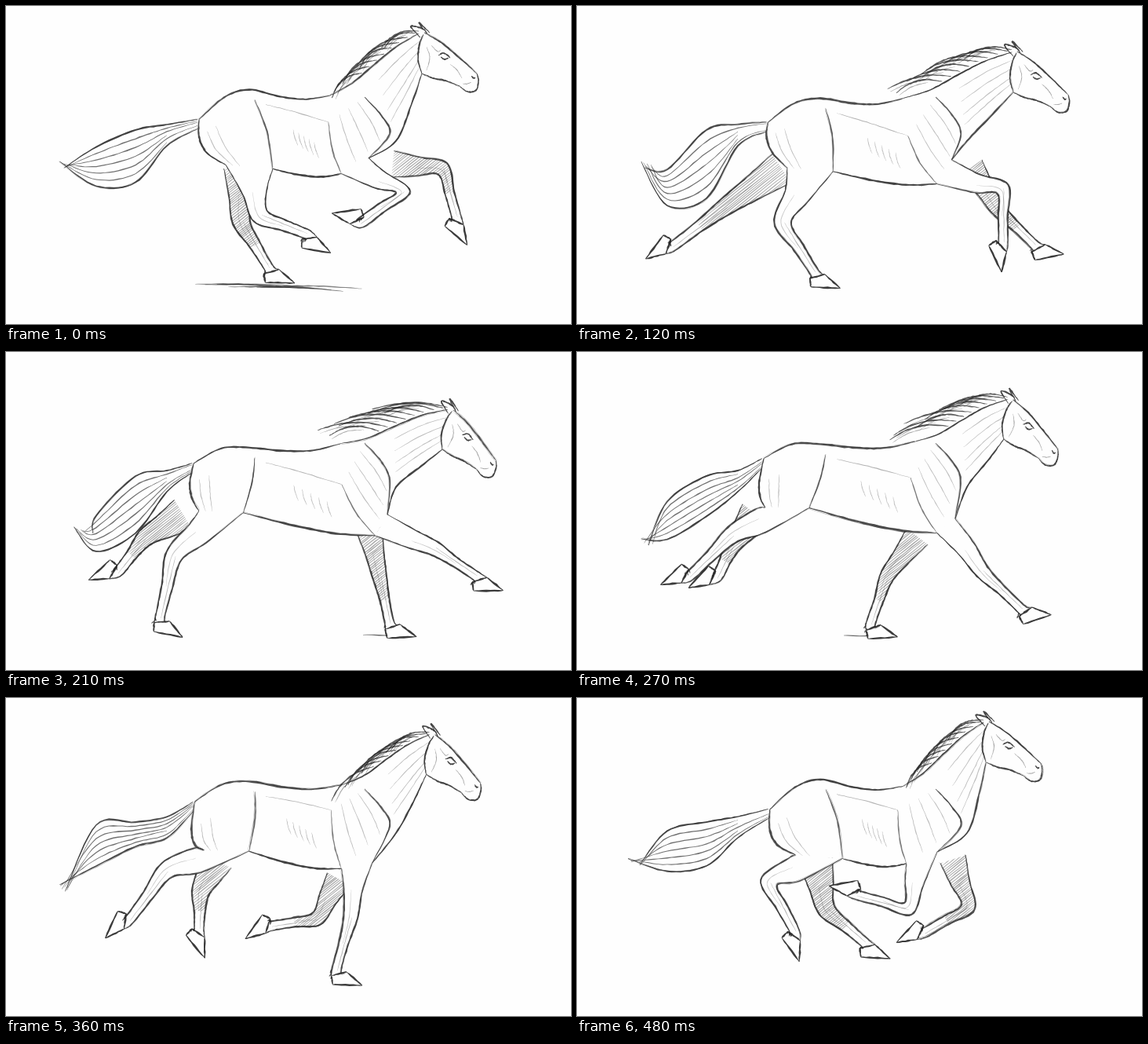
An HTML page with a canvas that plays this animation: 720x405 px, repeating every 510 ms.

```html
<!DOCTYPE html>
<html lang="en">
<head>
<meta charset="utf-8">
<title>Galloping horse</title>
<style>
html, body { margin: 0; width: 100%; height: 100%; overflow: hidden; background: #fefefe; }
canvas { display: block; }
</style>
</head>
<body>
<canvas id="stage" width="720" height="405"></canvas>
<script>
const ctx = document.getElementById('stage').getContext('2d');
const PAPER = '#fefefe', TAU = Math.PI * 2;

// A stride has 16 drawings; key poses fall on these.
const KEYS = [0, 1, 3, 6, 8, 11, 15], CYCLE = 16;

// Each key pose: fetlock x, y, bend of the joint above it, hoof angle.
const GAIT = {
  nearHind: [[384, 291, 30, 38], [397, 312, 17, 35], [303, 340, 38, 31], [196, 339, 24, 40],
    [143, 286, 12, 164], [157, 283, 24, 143], [278, 298, 51, 82]],
  farHind: [[335, 334, 18, 30], [276, 337, 29, 39], [122, 306, 2, 155], [142, 281, 10, 166],
    [178, 288, 5, 161], [246, 294, 9, 79], [367, 312, 20, 32]],
  nearFront: [[451, 277, -58, 200], [478, 288, -48, 171], [543, 301, -42, 93], [600, 286, -6, 28],
    [567, 328, 7, 10], [421, 347, -6, 30], [357, 251, -48, 198]],
  farFront: [[574, 269, -36, 69], [594, 279, -23, 42], [584, 305, 7, 17], [489, 346, 0, 26],
    [374, 347, 10, 25], [339, 290, -25, 154], [443, 299, -40, 161]],
};
// Poll x, y and tilt of the head.
const NOD = [[530, 38, 0], [536, 40, 0], [558, 62, 2.5], [566, 77, 12], [552, 64, 10], [543, 50, 9], [522, 34, 1]];

const HIND_RADII = [22, 16, 11, 7, 6], FRONT_RADII = [17, 12, 9, 6, 6];
const HOOF = [[12, -5], [38, 0], [5, 18], [-2, 9]];

let step = 0, seed = 1;
const rnd = () => { const v = Math.sin(seed++ * 12.9898) * 43758.5453; return v - Math.floor(v); };
const wave = (mean, amp, peak) => mean + amp * Math.cos((step - peak) / CYCLE * TAU);
const lerp = (a, b, t) => a + (b - a) * t;
const mix = (p, q, t) => p.map((v, i) => lerp(v, q[i], t));
const add = ([x, y], dx, dy) => [x + dx, y + dy];
const between = (a, b, t) => a.map((p, i) => mix(p, b[i], t));
const rotate = ([x, y], a) => [x * Math.cos(a) - y * Math.sin(a), x * Math.sin(a) + y * Math.cos(a)];
const place = (p, origin, degrees) => add(rotate(p, degrees * TAU / 360), ...origin);

// Monotone cubic through the cyclic key poses.
function tween(rows) {
  const n = KEYS.length;
  const at = k => rows[(k + n) % n];
  const gap = k => (KEYS[(k + 1) % n] - KEYS[k % n] + CYCLE) % CYCLE;
  const k = KEYS.findLastIndex(s => s <= step), h = gap(k), u = (step - KEYS[k]) / h;
  return at(k).map((v, i) => {
    const slope = j => (at(j + 1)[i] - at(j)[i]) / gap((j + n) % n);
    const tangent = j => {
      const a = slope(j - 1), b = slope(j);
      return a * b <= 0 ? 0 : 2 * a * b / (a + b);
    };
    return lerp(v, at(k + 1)[i], u * u * (3 - 2 * u)) +
      h * u * (1 - u) * (tangent(k) * (1 - u) - tangent(k + 1) * u);
  });
}

// Catmull-Rom curve.
function smooth(pts, n = 9) {
  const out = [];
  for (let i = 0; i < pts.length - 1; i++) {
    const a = pts[i - 1] || pts[i], b = pts[i], c = pts[i + 1], d = pts[i + 2] || c;
    for (let s = 0; s < n; s++) {
      const t = s / n;
      out.push([0, 1].map(j => b[j] + t * ((c[j] - a[j]) / 2 +
        t * (a[j] - 2.5 * b[j] + 2 * c[j] - d[j] / 2 + t * (1.5 * (b[j] - c[j]) + (d[j] - a[j]) / 2)))));
    }
  }
  return [...out, pts[pts.length - 1]];
}

function trace(pts) {
  ctx.beginPath();
  pts.forEach(p => ctx.lineTo(...p));
  ctx.closePath();
}
function fill(pts, style = PAPER) {
  trace(pts);
  ctx.fillStyle = style;
  ctx.fill();
}
function normals(line) {
  const last = line.length - 1;
  return line.map((_, i) => {
    const p = line[Math.max(0, i - 1)], q = line[Math.min(last, i + 1)];
    const dx = q[0] - p[0], dy = q[1] - p[1], len = Math.hypot(dx, dy) || 1;
    return [-dy / len, dx / len];
  });
}

// Tapered stroke with uneven edges.
function pencil(pts, width = 1.7, alpha = .8) {
  const line = smooth(pts), left = [], right = [];
  normals(line).forEach(([nx, ny], i) => {
    const taper = .35 + .65 * Math.sin(Math.PI * i / (line.length - 1));
    const w = width * taper * (.7 + .6 * rnd()) / 2, shift = (rnd() - .5) * .5;
    left.push(add(line[i], nx * (shift + w), ny * (shift + w)));
    right.unshift(add(line[i], nx * (shift - w), ny * (shift - w)));
  });
  fill([...left, ...right], `rgba(38,38,38,${alpha})`);
}
// A firm line with loose lines searching around it.
function sketch(pts, width = 2.1, alpha = .8) {
  pencil(pts, width, alpha);
  for (let i = 0; i < 2; i++) {
    const dx = rnd() * 2.6 - 1.3, dy = rnd() * 2.6 - 1.3;
    pencil(pts.map(p => add(p, dx, dy)), 1, .33);
  }
}

function limb(keys, root, radii, frontTop, rearTop) {
  const [x, y, bend, angle] = tween(keys), foot = [x, y];
  const [nx, ny] = normals([root, foot])[0];
  const knee = add(mix(root, foot, .5), nx * bend, ny * bend);
  const axis = [root, mix(root, knee, .5), knee, mix(knee, foot, .5), foot];
  const normal = normals(axis);
  const edge = sign => axis.map((p, i) => add(p, ...normal[i].map(v => v * sign * radii[i])));
  const front = edge(-1), rear = edge(1);
  if (frontTop) [front[0], rear[0]] = [frontTop, rearTop];
  const hoof = HOOF.map(p => place(p, foot, angle));
  return { front, rear, hoof, foot, shape: [...smooth(front), ...hoof, ...smooth(rear).reverse()] };
}

function drawLimb({ front, rear, hoof }) {
  const [top, toe, heel, back] = hoof;
  sketch([...front, top]);
  sketch([...rear, back]);
  [[top, toe], [toe, heel], [heel, back], [top, back]].forEach(line => pencil(line, 2.3, .9));
  for (let i = 0; i < 4; i++) {
    const root = mix(rear[4], back, i / 3);
    pencil([root, add(root, rnd() * 6 - 4, 2 + rnd() * 3)], 1.4, .75);
  }
  pencil(between(front, rear, .4).slice(2), .9, .35);
  pencil(between(front, rear, .6).slice(1, 4), .9, .25);
}

function hatch({ front, rear }) {
  const area = [...smooth(front.slice(0, 4)), ...smooth(rear.slice(0, 4)).reverse()];
  const xs = area.map(p => p[0]), ys = area.map(p => p[1]);
  const left = Math.min(...xs), width = Math.max(...xs) - left;
  ctx.save();
  trace(area);
  ctx.clip();
  for (let y = Math.min(...ys); y < Math.max(...ys) + width; y += 2.5 + rnd() * 1.5)
    pencil([[left, y], [left + width, y - width * .8]], 1.2, .4);
  ctx.restore();
}

function drawTail(base) {
  const tip = [wave(75, 12, 5.5), wave(222, 24, 9.5)];
  const strands = 7;
  for (let i = 0; i < strands; i++) {
    const k = i / (strands - 1), outer = i === 0 || i === strands - 1;
    const line = [
      add(base, -2, k * 12),
      [205, 151 + k * 27],
      [165, lerp(158, wave(217, 28, 3.3), k)],
      [115, lerp(wave(185, 28, 4.5), wave(234, 24, 4.5), k)],
      add(tip, (1 - k) * 26 * rnd(), (1 - k) * 8 - 4),
    ];
    const from = outer ? 0 : Math.floor(rnd() * 2);
    if (outer) sketch(line, 2);
    else pencil(line.slice(from), 1.3, .65);
  }
}

function drawMane(crest) {
  const curve = smooth(crest), count = 9;
  const droop = wave(18, 18, 13.5), length = wave(68, -16, 14);
  for (let i = 0; i < count; i++) {
    const k = i / count;
    const root = add(curve[Math.floor(k * curve.length * .72)], 0, -3);
    const reach = length * (.75 + rnd() * .4), angle = 180 - droop * (.7 + .6 * k);
    const lock = [[0, 0], [reach * .35, 6], [reach * .7, 4], [reach, -2 - rnd() * 4]];
    pencil(lock.map(p => place(p, root, angle)), 2, .75);
    pencil(lock.slice(1).map(p => place(add(p, -3, -4), root, angle)), 1, .4);
  }
}

function drawHead(origin, tilt) {
  const outline = [
    [[3, -4], [25, 9], [50, 30], [70, 48]],
    [[70, 48], [72, 57], [69, 69], [58, 71], [48, 64]],
    [[48, 64], [30, 57], [15, 54], [0, 48]],
    [[0, 48], [-5, 30], [-3, 10], [2, -2]],
  ];
  const details = [
    [[-2, 2], [-14, -12], [1, -9], [7, -2]],
    [[2, -8], [-4, -17], [10, -4]],
    [[21, 25], [28, 22], [36, 28]],
    [[24, 27], [29, 30], [34, 28]],
    [[63, 51], [66, 54], [68, 53]],
  ];
  const faint = [
    [[52, 61], [58, 61], [63, 59]],
    [[36, 36], [45, 44], [51, 54]],
    [[6, 14], [10, 28], [6, 44]],
    [[12, 12], [20, 20], [24, 18]],
  ];
  const put = line => line.map(p => place(p, origin, tilt));
  fill(outline.flatMap(line => smooth(put(line))));
  outline.forEach(line => sketch(put(line), 1.9));
  details.forEach(line => pencil(put(line), 2, .85));
  faint.forEach(line => pencil(put(line), 1, .4));
}

function drawGround(planted) {
  if (step === 0) {
    for (let i = 0; i < 7; i++) {
      const x = 232 + i * 17 + rnd() * 10, y = 354 + rnd() * 5;
      pencil([[x, y], [x + 55, y], [x + 110, y + 1 + rnd() * 4]], 1.6, .55);
    }
  } else if (step > 5 && step < 9) {
    const [x, y] = planted;
    pencil([[x - 34, y + 14], [x + 34, y + 16]], 1.4, .7);
  }
}

function draw() {
  seed = 1 + step * 977;
  ctx.fillStyle = PAPER;
  ctx.fillRect(0, 0, 720, 405);

  // Landmarks of the trunk.
  const [px, py, tilt] = tween(NOD), poll = [px, py];
  const withers = [wave(422, 10, 9), wave(114, 4, 4)];
  const croup = [310, wave(112, 10, 5.5)];
  const dock = [wave(242, 4, 0), wave(140, 8, 2.5)];
  const buttock = [wave(239, 7, 0), 167];
  const seat = [wave(260, 20, 0), wave(200, 6, 3)];
  const flank = [wave(318, 22, 0), wave(203, 8, 2.5)];
  const elbow = [wave(443, 28, 5.5), wave(222, 12, 6)];
  const breast = [497, 172];
  const brisket = [wave(472, 14, 6), wave(203, 10, 9)];
  const nape = place([-4, -3], poll, tilt), throat = place([0, 48], poll, tilt);

  const crest = [nape, add(mix(nape, withers, .25), 0, -3), mix(nape, withers, .5),
    add(mix(nape, withers, .75), 0, 4), withers];
  const back = [withers, add(mix(withers, croup, .3), 0, 7), add(mix(withers, croup, .62), 0, 6),
    croup, add(mix(croup, dock, .5), 0, -9), dock];
  const rump = [dock, buttock, add(buttock, wave(6, 4, 0), 20), seat];
  const belly = [flank, add(mix(flank, elbow, .35), 0, 5), add(mix(flank, elbow, .7), 0, 6), elbow];
  const chest = [throat, add(mix(throat, breast, .5), 3, -3), breast, brisket];
  const shoulder = [[457, 116], [478, 139], [489, 163], brisket];
  const thighTop = add(croup, 7, 13);
  const thigh = [thighTop, add(mix(thighTop, flank, .5), 4, -4), flank];
  const armTop = [wave(418, 10, 6), wave(154, 16, 5)];
  const arm = [armTop, add(mix(armTop, elbow, .5), -3, 4), elbow];

  const farHind = limb(GAIT.farHind, [wave(264, 40, -1.2), 207], HIND_RADII);
  const farFront = limb(GAIT.farFront, [wave(463, 42, 2), wave(218, 18, 9)], FRONT_RADII);
  const nearHind = limb(GAIT.nearHind, mix(seat, flank, .5), HIND_RADII, flank, seat);
  const nearFront = limb(GAIT.nearFront, add(elbow, 18, -8), FRONT_RADII, brisket, elbow);

  drawGround(farFront.foot);
  drawTail(dock);
  for (const leg of [farHind, farFront]) {
    fill(leg.shape);
    hatch(leg);
    drawLimb(leg);
  }

  fill([crest, back, rump, belly].flatMap(line => smooth(line)).concat(smooth(chest).reverse()));
  fill(nearHind.shape);
  fill(nearFront.shape);

  sketch(crest, 1.8);
  sketch(back, 2.4);
  sketch(rump, 2.5);
  sketch(belly, 2.7);
  sketch(chest, 2.1);
  sketch(shoulder, 2, .7);
  sketch(thigh, 1.6, .65);
  pencil(arm, 1.6, .6);

  // Faint modelling of neck, shoulder, ribs and haunch.
  for (const t of [.2, .4, .6, .75]) pencil(between(crest.slice(0, 4), chest, t).slice(0, 3), 1, .3);
  for (const t of [.3, .55, .8]) pencil(between(arm, shoulder.slice(0, 3), t), 1, .3);
  for (const t of [.15, .3]) pencil(between(rump, [croup, thighTop, thigh[1], flank], t).slice(1), 1, .3);
  for (let i = 0; i < 5; i++) {
    const top = add(mix(thigh[1], arm[1], .4 + i * .08), 0, -12 + i * 2);
    pencil([top, add(top, 2, 10), add(top, 6, 20)], .9, .3);
  }
  pencil([add(thighTop, 14, 6), mix(thighTop, armTop, .55), armTop], 1, .35);

  drawLimb(nearHind);
  drawLimb(nearFront);
  drawHead(poll, tilt);
  drawMane(crest);
}

// The first drawing is held twice as long as the others.
let shown = -1;
function tick() {
  step = Math.max(0, Math.floor((performance.now() % 510) / 30) - 1);
  if (step !== shown) draw();
  shown = step;
  requestAnimationFrame(tick);
}
tick();
</script>
</body>
</html>
```
